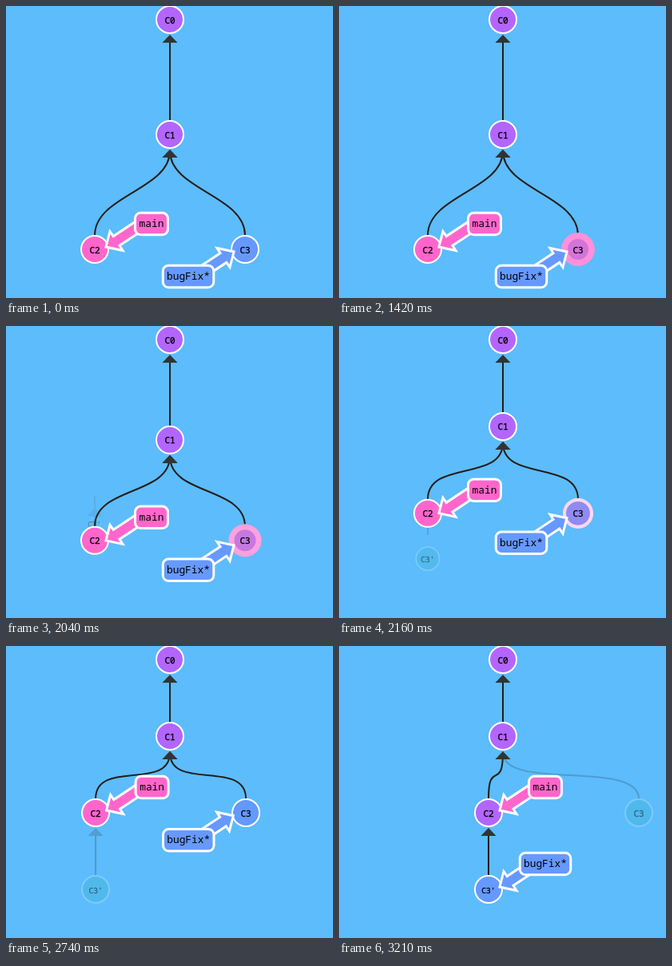
An HTML page for the animation above (4.72 s loop, 409 px wide and 366 px high).

```html
<!DOCTYPE html>
<html lang="en">
<head>
<meta charset="utf-8">
<title>Rebase</title>
<style>
  html, body { margin: 0; width: 100%; height: 100%; overflow: hidden; background: #5cbcfc; }
  svg { display: block; width: 409px; height: 366px; }
  text { font-family: "Noto Sans Mono", "DejaVu Sans Mono", monospace; text-anchor: middle; fill: #000; }
  .line { fill: none; stroke: #241c18; stroke-width: 2; }
  .head { fill: #333; }
  .name { stroke: #000; stroke-width: 0.3; }
  .tag { stroke: #fff; stroke-width: 3; }
</style>
</head>
<body>
<svg id="stage" viewBox="0 0 409 366"></svg>
<script>
const LOOP = 4720;
const PURPLE = [178, 102, 255], PINK = [255, 102, 204], BLUE = [102, 153, 255];
const TEAL = [36, 178, 178], WHITE = [255, 255, 255];
const R = 17, FADED = 0.2;
const LAG = 8; // branches start a little after the commits

// [start, frame step] of each stretch of motion
const STEPS = [[1080, 41.54], [1620, 250], [1870, 42.5], [2410, 41.54], [2950, 40]];

const stage = document.getElementById('stage');
const lerp = (a, b, p) => a + (b - a) * p;
const mix = (a, b, p) => a.map((v, i) => lerp(v, b[i], p));
const rgb = c => `rgb(${c.map(Math.round)})`;

function add(tag, attrs, parent = stage) {
  const el = document.createElementNS('http://www.w3.org/2000/svg', tag);
  set(el, attrs);
  parent.append(el);
  return el;
}

function set(el, attrs) {
  for (const k in attrs) el.setAttribute(k, attrs[k]);
}

function easeInOut(n) {
  const q = 0.48 - n / 1.04, root = Math.sqrt(0.1734 + q * q);
  const t = Math.cbrt(root - q) + Math.cbrt(-root - q) + 0.5;
  return t * t * (3 - 2 * t);
}

function bounce(n) {
  const s = 7.5625, p = 2.75;
  if (n < 1 / p) return s * n * n;
  if (n < 2 / p) return s * (n - 1.5 / p) ** 2 + 0.75;
  if (n < 2.5 / p) return s * (n - 2.25 / p) ** 2 + 0.9375;
  return s * (n - 2.625 / p) ** 2 + 0.984375;
}

// eased progress of a move, pinned to exact ends
function progress(t, start, length, ease = easeInOut) {
  const n = (t - start) / length;
  return n <= 0 ? 0 : n >= 1 ? 1 : ease(n);
}

function makeEdge() {
  const g = add('g', {});
  const line = add('path', { class: 'line' }, g);
  const head = add('path', { class: 'head' }, g);
  return (x1, y1, x2, y2, opacity = 1) => {
    const from = y1 - 17.5, tip = y2 + 19.5;
    set(g, { opacity });
    set(line, { d: `M${x1} ${from}C${x1} ${from - 50} ${x2} ${tip + 50} ${x2} ${tip + 1}` });
    set(head, { d: `M${x2} ${tip - 0.5}l9.5 10h-19z` });
  };
}

function makeNode(name) {
  const dot = add('circle', {});
  const label = add('text', { class: 'name', 'font-size': name.length > 2 ? 9.6 : 11 });
  label.textContent = name;
  return (x, y, fill, { r = R, opacity = 1, ring = WHITE, width = 2 } = {}) => {
    set(dot, { cx: x, cy: y, r, opacity, fill: rgb(fill), stroke: rgb(ring), 'stroke-width': width });
    set(label, { x, y: y + 4.5, opacity: Math.sqrt(opacity) });
  };
}

// pointer outline relative to its commit
const POINTER = [[14, -3], [19, -22.5], [23.2, -16.4], [60, -40.8], [67.8, -29.1], [31, -4.7], [35, 1.5]];

function makeBranch(name, color, w) {
  const look = { class: 'tag', fill: rgb(color) };
  const arrow = add('polygon', look);
  const box = add('rect', { ...look, width: w, height: 27.5, rx: 7 });
  const label = add('text', { 'font-size': 12.9 });
  label.textContent = name;
  // side: 1 puts the label right of the commit, -1 left
  return (x, y, lx, ly, side = 1) => {
    set(arrow, { points: POINTER.map(([px, py]) => [x + px * side, y + py * side]).join(' ') });
    set(box, { x: lx - w / 2, y: ly - 13.75 });
    set(label, { x: lx, y: ly + 4 });
  };
}

const edge1 = makeEdge(), edge3 = makeEdge(), edge2 = makeEdge(), edgeCopy = makeEdge();
const copy = makeNode("C3'");
const [c0, c1, c2, c3] = ['C0', 'C1', 'C2', 'C3'].map(makeNode);
const main = makeBranch('main', PINK, 41);
const bugFix = makeBranch('bugFix*', BLUE, 63.5);

function snap(t) {
  const step = STEPS.filter(s => s[0] <= t + 1).pop();
  if (!step) return t;
  const [start, size] = step;
  return start + Math.floor((t + 1 - start) / size) * size;
}

// moves shared by commits and branches
function pose(t) {
  const lift = progress(t, 1869, 400), shift = progress(t, 2667, 400);
  return {
    lift, shift,
    y1: lerp(161, 113, lift), y2: lerp(305, 209, lift),
    x2: lerp(111, 187, shift), x3: lerp(299, 375, shift),
  };
}

function drawCommits(t) {
  const { lift, shift, y1, y2, x2, x3 } = pose(t);
  const glow = progress(t, 1078, 528) * (1 - lift);
  const drop = progress(t, 1855, 800, bounce);
  const fade = lerp(1, FADED, shift);
  const mid = 205, y0 = 17;

  edge1(mid, y1, mid, y0);
  edge2(x2, y2, mid, y1);
  edge3(x3, y2, mid, y1, fade);
  edgeCopy(x2, lerp(209, 305, lift), x2, 209, lerp(FADED * lift, 1, shift));

  c0(mid, y0, PURPLE);
  c1(mid, y1, PURPLE);
  c2(x2, y2, mix(PINK, PURPLE, shift));
  c3(x3, y2, mix(mix(BLUE, PINK, glow), TEAL, shift),
    { opacity: fade, ring: mix(WHITE, PINK, glow), width: lerp(2, 10, glow) });
  copy(x2, lerp(209, 305, drop), mix(TEAL, BLUE, shift),
    { r: R * drop, opacity: lerp(FADED * drop, 1, shift) });
}

function drawBranches(t) {
  const { shift, y2, x2 } = pose(t);
  main(x2, y2, x2 + 71, y2 - 32);
  bugFix(lerp(299, 187, shift), lerp(y2, 305, shift),
    lerp(228, 258, shift), lerp(y2 + 34, 273, shift), lerp(-1, 1, shift));
}

const begin = performance.now();
function tick() {
  const t = snap((performance.now() - begin) % LOOP);
  drawCommits(t);
  drawBranches(t - LAG);
  requestAnimationFrame(tick);
}
tick();
</script>
</body>
</html>
```
